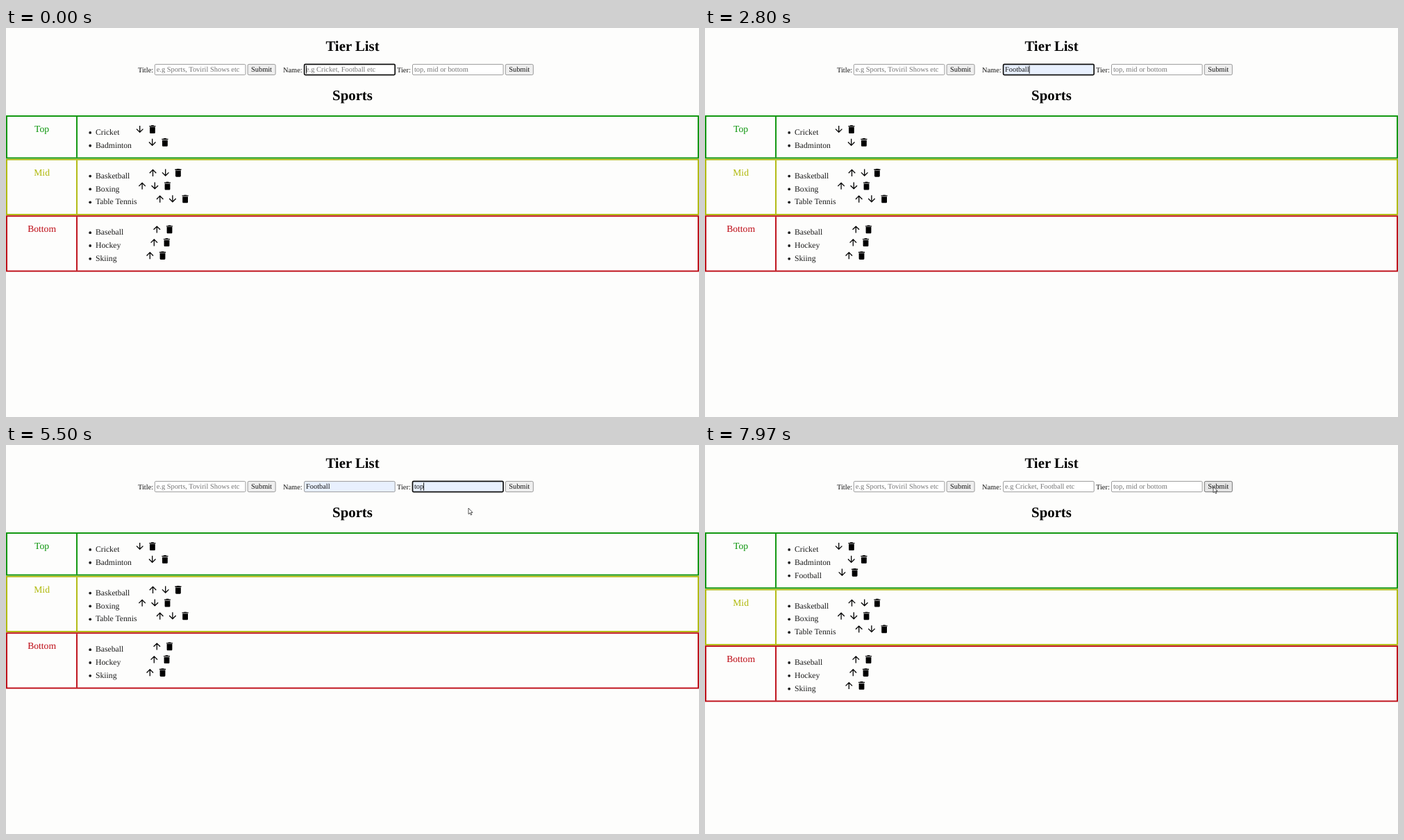
An HTML page for the animation above (8 s loop, 998 px wide and 561 px high).

```html
<!DOCTYPE html>
<html lang="en">
<head>
<meta charset="utf-8">
<title>Tier List</title>
<style>
  html, body { margin: 0; width: 100%; height: 100%; overflow: hidden; background: #fdfdfc; }
  svg { display: block; width: 100%; height: 100%; }
  text { font-family: "Liberation Serif", "Times New Roman", serif; text-rendering: geometricPrecision; white-space: pre; }
  .title { font-size: 20.8px; font-weight: bold; text-anchor: middle; }
  .form { font-size: 10.4px; fill: #111; }
  .mid { text-anchor: middle; }
  .tier { font-size: 13.65px; text-anchor: middle; }
  .item { font-size: 11.7px; fill: #1c1c1c; }
  .hint { font-family: "Open Sans", sans-serif; font-size: 8px; fill: #333; }
  .popup { filter: drop-shadow(0 1px 1.5px rgba(0, 0, 0, .22)); }
</style>
</head>
<body>
<svg id="stage" viewBox="0 0 998 561"></svg>
<script>
const LOOP = 8000;
const ROW = 18.85;
const BLINK = 500;
const stage = document.getElementById('stage');

const ICONS = {
  up: 'M4 12l1.41 1.41L11 7.83V20h2V7.83l5.58 5.59L20 12l-8-8-8 8z',
  down: 'M20 12l-1.41-1.41L13 16.17V4h-2v12.17l-5.58-5.59L4 12l8 8 8-8z',
  bin: 'M6 19c0 1.1.9 2 2 2h8c1.1 0 2-.9 2-2V7H6v12zM19 4h-3.5l-1-1h-5l-1 1H5v2h14V4z'
};

const TIERS = [
  { name: 'Top', color: '#079307', y: 126, icons: ['down', 'bin'],
    items: [['Cricket', 192.7], ['Badminton', 210.7], ['Football', 197.4]] },
  { name: 'Mid', color: '#b0b90b', y: 188.7, icons: ['up', 'down', 'bin'],
    items: [['Basketball', 211.5], ['Boxing', 196.1], ['Table Tennis', 221.7]] },
  { name: 'Bottom', color: '#bd0a14', y: 270.25, icons: ['up', 'bin'],
    items: [['Baseball', 217.3], ['Hockey', 213.3], ['Skiing', 207.3]] }
];

// Moments of the interaction, in ms
const TYPED = [[1300, 'F'], [1520, 'Fo'], [1720, 'Foo'], [2600, 'Football']];
const TIER_FOCUS = 4300, TIER_PICK = 5320, HOVER = 5800, PRESS = 6350, SAVED = 7700;

// Pointer keys: time, x, y
const POINTER = [
  [2950, 940, 561], [3370, 855, 325], [3950, 644, 63], [4650, 644, 63],
  [5100, 666, 91], [5560, 666, 91], [5820, 732, 60], [LOOP, 732, 60]
];

function add(parent, tag, attrs = {}, text) {
  const el = document.createElementNS('http://www.w3.org/2000/svg', tag);
  set(el, attrs);
  if (text !== undefined) el.textContent = text;
  parent.appendChild(el);
  return el;
}

function set(el, attrs) {
  for (const key in attrs) el.setAttribute(key, attrs[key]);
}

function show(el, on) {
  el.style.display = on ? '' : 'none';
}

function label(x, y, text, cls, parent = stage) {
  return add(parent, 'text', { x, y, class: cls }, text);
}

function makeButton(x) {
  const box = add(stage, 'rect', {
    x: x + .5, y: 52.4, width: 40, height: 15.2, rx: 1.8,
    fill: '#efefef', stroke: '#808080', 'stroke-width': .8
  });
  label(x + 20.4, 63.3, 'Submit', 'form mid');
  return box;
}

function makeField(x, hint) {
  const box = add(stage, 'rect', { x, y: 52.4, width: 130.6, height: 15.2, rx: 1.5 });
  const text = label(x + 2.4, 63.3, '', 'form');
  const caret = add(stage, 'rect', { y: 54.3, width: .9, height: 11.4, fill: '#000' });
  return function (value, focused, filled, caretOn) {
    set(box, {
      fill: filled ? '#e8f0fe' : '#fff',
      stroke: focused ? '#101010' : '#858585',
      'stroke-width': focused ? 1.7 : .8
    });
    text.textContent = value || hint;
    text.style.fill = value ? '#111' : '#757575';
    show(caret, focused && caretOn);
    if (focused) set(caret, { x: x + 2.4 + (value ? text.getComputedTextLength() : 0) });
  };
}

function makeTier({ name, color, y, icons, items }) {
  const g = add(stage, 'g');
  const frame = add(g, 'rect', { x: 1, y: 1, width: 996, fill: 'none', stroke: color, 'stroke-width': 1.9 });
  const divider = add(g, 'rect', { x: 101.1, y: 2, width: 1.9, fill: color });
  set(label(51.6, 24, name, 'tier', g), { fill: color });
  const rows = items.map(([text, x], i) => {
    const row = add(g, 'g', { transform: `translate(0 ${i * ROW})` });
    add(row, 'circle', { cx: 121.2, cy: 24.9, r: 1.9, fill: '#1c1c1c' });
    label(129, 28, text, 'item', row);
    icons.forEach((icon, k) => add(row, 'path', {
      d: ICONS[icon],
      transform: `translate(${x + k * 18.2 - 7.8} 12.3) scale(.65)`
    }));
    return row;
  });
  return function (count, shift) {
    const height = 25 + count * ROW;
    set(g, { transform: `translate(0 ${y + shift})` });
    set(frame, { height: height - 2.2 });
    set(divider, { height: height - 4 });
    rows.forEach((row, i) => show(row, i < count));
  };
}

function makePopup(x, hints) {
  const g = add(stage, 'g', { class: 'popup' });
  const height = 28.5 + (hints.length - 1) * 23;
  add(g, 'path', { d: `M${x + 12} 74l4-3.5 4 3.5z`, fill: '#fff' });
  add(g, 'rect', { x, y: 73.8, width: 56, height, rx: 2, fill: '#fff' });
  const glow = add(g, 'rect', { x, y: 78, width: 56, height: 20, fill: '#ececec' });
  hints.forEach((hint, i) => label(x + 8, 91 + i * 23, hint, 'hint', g));
  return function (alpha, lit) {
    show(g, alpha > 0);
    g.style.opacity = alpha;
    show(glow, lit);
  };
}

function fade(t, from, to) {
  return Math.max(0, Math.min(1, (t - from) / 100, (to - t) / 100));
}

function pointerAt(t) {
  const i = POINTER.findIndex(key => key[0] > t);
  if (i < 1) return null;
  const [t0, x0, y0] = POINTER[i - 1], [t1, x1, y1] = POINTER[i];
  const p = (t - t0) / (t1 - t0), e = p * p * (3 - 2 * p);
  return [x0 + (x1 - x0) * e, y0 + (y1 - y0) * e];
}

add(stage, 'rect', { width: 998, height: 561, fill: '#fdfdfc' });
label(499, 33, 'Tier List', 'title');
label(499, 104, 'Sports', 'title');
label(190, 63.6, 'Title:', 'form');
label(399, 63.6, 'Name:', 'form');
label(563, 63.6, 'Tier:', 'form');
const titleField = makeField(214.3, 'e.g Sports, Toviril Shows etc');
makeButton(347.6);
const nameField = makeField(429.6, 'e.g Cricket, Football etc');
const tierField = makeField(585.5, 'top, mid or bottom');
const saveButton = makeButton(718.8);
const tiers = TIERS.map(makeTier);
const namePopup = makePopup(481, ['Football']);
const tierPopup = makePopup(637, ['top', 'mid', 'bottom', 'Top']);
const arrow = add(stage, 'path', {
  d: 'M0 0V8.7L2 6.9 3.4 10 4.8 9.4 3.4 6.4H6z',
  fill: '#fff', stroke: '#111', 'stroke-width': .7
});
const beam = add(stage, 'path', {
  d: 'M-1.8-4.5H-.5L0-4 .5-4.5H1.8M0-4V4M-1.8 4.5H-.5L0 4 .5 4.5H1.8',
  fill: 'none', stroke: '#111', 'stroke-width': .8
});

function draw(t) {
  const saved = t >= SAVED;
  const typed = TYPED.filter(step => t >= step[0]).pop() || [0, ''];
  const picked = t >= TIER_PICK;
  const onTier = t >= TIER_FOCUS && t < PRESS;
  const since = picked ? TIER_PICK : onTier ? TIER_FOCUS : typed[0];
  const caretOn = Math.floor((t - since) / BLINK) % 2 === 0;

  titleField('', false, false, false);
  nameField(saved ? '' : typed[1], t < TIER_FOCUS, !saved && typed[1] === 'Football', caretOn);
  tierField(picked && !saved ? 'top' : '', onTier, picked && !saved, caretOn);
  set(saveButton, t >= HOVER
    ? { fill: '#e5e5e5', stroke: '#555' }
    : { fill: '#efefef', stroke: '#808080' });

  const shift = saved ? ROW : 0;
  tiers[0](saved ? 3 : 2, 0);
  tiers[1](3, shift);
  tiers[2](3, shift);

  namePopup(fade(t, 1330, 2660), t > 2420);
  tierPopup(fade(t, TIER_FOCUS + 50, TIER_PICK + 120), t > 4950);

  const at = pointerAt(t);
  const overField = at && at[1] > 52 && at[1] < 68 && at[0] > 585 && at[0] < 716;
  show(arrow, at && !overField);
  show(beam, overField);
  if (at) {
    const move = { transform: `translate(${at[0]} ${at[1]})` };
    set(arrow, move);
    set(beam, move);
  }
}

const start = performance.now();
function tick() {
  draw((performance.now() - start) % LOOP);
  requestAnimationFrame(tick);
}
tick();
</script>
</body>
</html>
```
